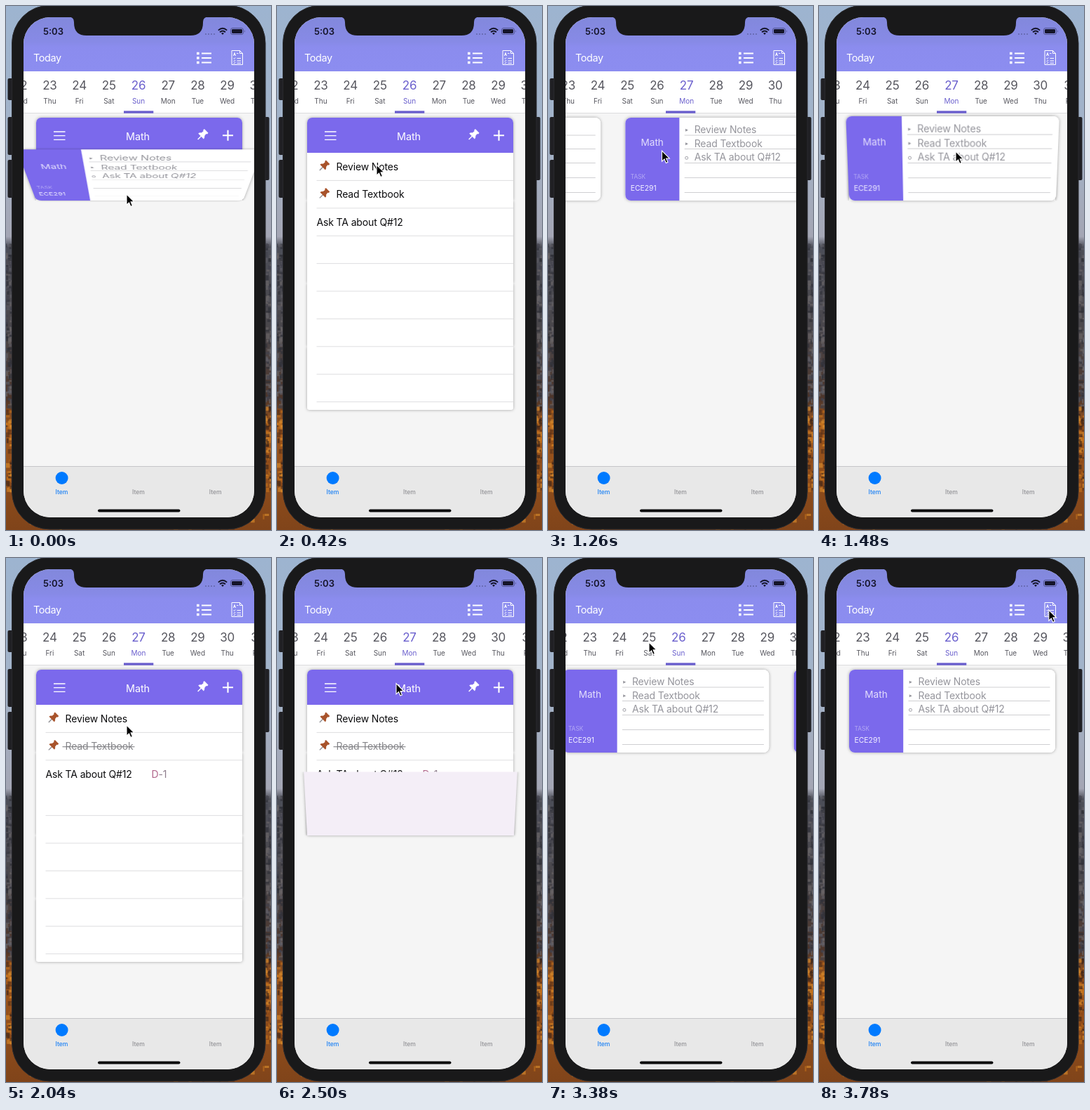
Recreate the animation shown at these times as an HTML page. Size 378 px wide and 746 px high, loop 3800 ms.

```html
<!DOCTYPE html>
<html lang="en">
<head>
<meta charset="utf-8">
<title>Folding planner card</title>
<style>
html, body { margin: 0; width: 100%; height: 100%; overflow: hidden; background: #1a1a1b; }
#stage { position: relative; width: 378px; height: 746px; overflow: hidden; }
svg { display: block; }
svg text { font-family: Inter, Roboto, sans-serif; white-space: pre; }
.layer { position: absolute; left: 0; top: 0; }
#view { position: absolute; left: 25px; top: 153px; width: 329px; height: 502px; overflow: hidden; }
.page { position: absolute; left: -25px; top: -153px; width: 378px; height: 746px; }
.piece { position: absolute; left: 42.5px; width: 294.5px; }
.face { position: absolute; left: 0; top: 0; width: 100%; height: 100%; overflow: hidden; background: #fff; box-shadow: 0 0 4px rgba(0,0,0,.34); }
.item { font-size: 14px; letter-spacing: -.01em; }
</style>
</head>
<body>
<div id="stage">
  <svg class="layer" width="378" height="746" viewBox="0 0 378 746">
    <defs>
      <linearGradient id="wall" x2="0" y2="1">
        <stop offset="0" stop-color="#9db4d0"/><stop offset=".25" stop-color="#a3b3c8"/>
        <stop offset=".44" stop-color="#a4a6b4"/><stop offset=".46" stop-color="#4c4e58"/>
        <stop offset=".62" stop-color="#4a474b"/><stop offset=".75" stop-color="#4d352a"/>
        <stop offset=".8" stop-color="#a0571c"/><stop offset="1" stop-color="#80441a"/>
      </linearGradient>
      <linearGradient id="bar" x2="0" y2="1">
        <stop offset="0" stop-color="#8288dc"/><stop offset=".45" stop-color="#878ae6"/>
        <stop offset=".55" stop-color="#8b8cee"/><stop offset="1" stop-color="#8c8df0"/>
      </linearGradient>
      <clipPath id="screen"><rect x="25" y="16" width="329" height="712" rx="38"/></clipPath>
    </defs>
    <rect width="378" height="746" fill="url(#wall)"/>
    <g id="rocks"></g>
    <g fill="#202024">
      <rect x="2.5" y="103" width="8" height="31" rx="2"/>
      <rect x="2.5" y="158" width="8" height="54" rx="2"/>
      <rect x="2.5" y="219" width="8" height="54" rx="2"/>
      <rect x="368" y="158" width="7.5" height="90" rx="2"/>
    </g>
    <rect x="8.5" y="-1" width="361.5" height="746" rx="54" fill="#19191a" stroke="#2a2a2e"/>
    <g clip-path="url(#screen)">
      <rect x="25" y="16" width="329" height="712" fill="#f5f5f5"/>
      <rect x="25" y="16" width="329" height="77" fill="url(#bar)"/>
      <path d="M90 15.5Q97 16 97 23V24Q97 42 115 42H263Q281 42 281 24V23Q281 16 288 15.5Z" fill="#19191a"/>
      <text x="53" y="41" font-size="13" font-weight="600" fill="#15152a">5:03</text>
      <g fill="#6468ad"><circle cx="285" cy="40" r="1.1"/><circle cx="289" cy="40" r="1.1"/><circle cx="293" cy="40" r="1.1"/><circle cx="297" cy="40" r="1.1"/></g>
      <g fill="none" stroke="#15152a" stroke-width="1.9">
        <path d="M302.8 34.6Q309 29 315.2 34.6M305 37.2Q309 33.6 313 37.2"/>
        <path d="M309 41L307 38.8Q309 37.3 311 38.8Z" fill="#15152a" stroke="none"/>
      </g>
      <rect x="320.5" y="31.5" width="18" height="9" rx="2.6" fill="none" stroke="#4b4e86" stroke-width=".9"/>
      <rect x="322" y="33" width="15" height="6" rx="1.4" fill="#15152a"/>
      <path d="M340 34.3Q341.8 36 340 37.8Z" fill="#4b4e86"/>
      <text x="39" y="79" font-size="14.4" letter-spacing="-.35" fill="#fff">Today</text>
      <g stroke="#fff" stroke-width="2">
        <path d="M279 67.5H293M279 74H293M279 80.5H293"/>
        <path d="M272 67.5H275.6M272 74H275.6M272 80.5H275.6" stroke-width="3.4"/>
      </g>
      <g fill="none" stroke="#fff" stroke-width="1">
        <path d="M322 63.5H333.5L337.5 67.5V83.5H322ZM333.5 63.5V67.5H337.5"/>
        <path d="M324.5 71L326 66.5 327.5 71M325 69.5H327M329 67.5H331.5M324.5 74.5L325.5 75.5 327 73.5M329.5 74.5H335M324.5 78L325.5 79 327 77M329.5 78H335M324.5 81L325.5 82 327 80M329.5 81.3H335"/>
      </g>
      <rect x="25" y="93" width="329" height="60" fill="#fff"/>
      <path d="M25 152.5H354" stroke="#dcdcde"/>
      <g id="dates" text-anchor="middle"></g>
      <rect x="168" y="149.3" width="42.3" height="3.4" fill="#6a5fcd"/>
      <rect x="25" y="655" width="329" height="73" fill="#e8e8e8"/>
      <path d="M25 655.5H354" stroke="#c6c6c8"/>
      <circle cx="79.6" cy="672" r="9" fill="#007aff"/>
      <g font-size="8.6" font-weight="500" text-anchor="middle" fill="#929296">
        <text x="79.5" y="695" fill="#1a80f5">Item</text><text x="189" y="695">Item</text><text x="298.7" y="695">Item</text>
      </g>
      <rect x="131" y="716.4" width="117.5" height="4.2" rx="2.1" fill="#0b0b0c"/>
    </g>
  </svg>
  <div id="view"></div>
  <svg class="layer" width="378" height="746" viewBox="0 0 378 746">
    <path id="cursor" d="M0 0V15.2L3.5 11.9 5.9 17.4 8.4 16.3 6.1 10.9H10.8Z" fill="#000" stroke="#fff" stroke-width="1.1"/>
  </svg>
</div>
<script>
const LOOP = 3800, STEP = 60, DEPTH = 636, PAGE_W = 329, DAY_W = 42.2;
const DAYS = ['Sun', 'Mon', 'Tue', 'Wed', 'Thu', 'Fri', 'Sat'];
const PURPLE = '#7b69ec';
const $ = id => document.getElementById(id);
const clamp = (v, lo = 0, hi = 1) => Math.min(hi, Math.max(lo, v));
const easeIn = x => clamp(x) ** 1.7;
const easeOut = x => 1 - easeIn(1 - x);
const glide = (t, start, length) => 1 - (1 - clamp((t - start) / length)) ** 3;

// Cards: when each one opens, closes and gets its task crossed out
const CARDS = [
  { open: -45.7, close: 756.7, strike: 480, row: 0, due: false },
  { open: 1464.8, close: 2280, strike: 1910, row: 1, due: true }
];
const TASKS = ['Review Notes', 'Read Textbook', 'Ask TA about Q#12'];
const POINTER = [
  [0, 172, 268], [140, 172, 266], [420, 142, 226], [520, 142, 226], [730, 155, 195], [940, 155, 195],
  [1120, 236, 208], [1230, 160, 206], [1420, 195, 207], [1520, 195, 207], [1840, 152, 262],
  [1920, 152, 262], [2040, 172, 238], [2240, 170, 179], [2860, 170, 178], [3020, 92, 176],
  [3170, 168, 158], [3380, 144, 120], [3700, 326, 74], [3800, 328, 74]
];

function drawRocks() {
  let seed = 7, out = '';
  const rnd = () => (seed = seed * 16807 % 2147483647) / 2147483647;
  const stone = ['#2f3038', '#5e5d64', '#43434d', '#6b6668'];
  const leaf = ['#c4701d', '#3d2417', '#8d4a1a', '#d98a2c', '#59321a'];
  for (let i = 0; i < 420; i++) {
    const y = 338 + rnd() * 408, set = y > 570 ? leaf : stone;
    const x = y > 690 ? rnd() * 378 : rnd() < .5 ? rnd() * 9 - 2 : 368 + rnd() * 9;
    out += `<rect x="${x.toFixed(1)}" y="${y.toFixed(1)}" width="${(2 + rnd() * 5).toFixed(1)}" height="${(2 + rnd() * 6).toFixed(1)}" fill="${set[Math.floor(rnd() * set.length)]}" opacity=".65"/>`;
  }
  $('rocks').innerHTML = out;
}

function tack(x, y, size, body, needle) {
  return `<g transform="translate(${x} ${y}) rotate(45) scale(${size})">
    <path d="M0 2V9.5" stroke="${needle}" stroke-width="1.5"/>
    <path d="M-4.2-8.5H4.2V-6L2.9-5.2 3.4-1.4Q5.8 0 5.8 2.8H-5.8Q-5.8 0-3.4-1.4L-2.9-5.2-4.2-6Z" fill="${body}"/></g>`;
}

function closedArt() {
  const rules = [184, 203.5, 223.5, 244.5, 265.5].map(y => `M127 ${y}H329`).join('');
  const lines = TASKS.map((s, i) => `<text class="item" x="141" y="${181 + i * 19.7}">${s}</text>`).join('');
  return `<rect x="42" y="159" width="296" height="119" fill="#fff"/>
    <rect x="42" y="159" width="77.7" height="119" fill="${PURPLE}"/>
    <path d="${rules}" stroke="#cfcfd2"/>
    <g fill="#95959c">${lines}
      <path d="M128.3 174.7L132.3 176.7 128.3 178.7ZM128.3 194.2L132.3 196.2 128.3 198.2Z"/></g>
    <circle cx="130" cy="216.3" r="2" fill="none" stroke="#95959c" stroke-width=".9"/>
    <text x="81" y="199" font-size="13.6" text-anchor="middle" fill="#e3defc">Math</text>
    <text x="50" y="246" font-size="8.4" fill="#b3a8f4">TASK</text>
    <text x="50" y="263" font-size="10.4" fill="#f3f1ff">ECE291</text>`;
}

function openArt(card) {
  let rules = '';
  for (let i = 1; i < 10; i++) if (!(card.due && i === 3)) rules += `M56 ${209 + i * 39.4}H338`;
  const rows = TASKS.map((s, i) => {
    const y = 234 + i * 39.4, x = i < 2 ? 84 : 56;
    const own = i === card.row;
    return (i < 2 ? tack(66.5, y - 6.2, .92, '#a8532b', '#8d8d92') : '') +
      `<text class="item${own ? ' done' : ''}" x="${x}" y="${y}" fill="#0c0c0e">${s}</text>` +
      (own ? `<path class="cross" d="M80 ${y - 4.6}H${i ? 183 : 175}" stroke="#77777b" stroke-width="1.1"/>` : '');
  }).join('');
  const due = '<text class="item" x="207" y="312.8" fill="#b0648a">D<tspan fill="#8d7c8b">-1</tspan></text>';
  return `<path d="${rules}" stroke="#dedee0"/>
    <rect x="42" y="159" width="296" height="50" fill="${PURPLE}"/>
    <path d="M67.5 179H84M67.5 184.7H84M67.5 190.4H84" stroke="#fff" stroke-width="1.3"/>
    <text x="187.5" y="191" font-size="14.4" text-anchor="middle" letter-spacing="-.1" fill="#fff">Math</text>
    ${tack(279.5, 183.6, .95, '#fff', '#fff')}
    <path d="M308.5 184.3H323.5M316 176.8V191.8" stroke="#fff" stroke-width="2.1"/>
    ${rows}${card.due ? due : ''}`;
}

function piece(parent, top, height, art, radius, edge, pivot) {
  const el = document.createElement('div');
  el.className = 'piece';
  el.style.cssText = `top:${top}px;height:${height}px;transform-origin:50% ${pivot}`;
  el.innerHTML = `<div class="face" style="border-radius:${radius};clip-path:inset(${edge})">` +
    (art ? `<svg width="294.5" height="${height}" viewBox="42.5 ${art.y} 294.5 ${height}">${art.body}</svg>` : '') + '</div>';
  if (!art) el.firstChild.style.background = '#f4eef7';
  parent.append(el);
  return el;
}

function buildPage(card) {
  const el = document.createElement('div');
  el.className = 'page';
  $('view').append(el);
  const body = openArt(card), all = '-6px';
  const part = (y, h, r, edge) => piece(el, y, h, { y, body }, r, edge, 'top');
  const first = part(159, 118, '7px 7px 0 0', '-6px -6px 0');
  const second = part(277, 118, 0, '0 -6px');
  const third = part(395, 90, 0, '0 -6px');
  const fourth = part(485, 89.5, '0 0 3px 3px', '0 -6px -6px');
  const flap = (owner, top) => {
    const f = piece(owner, top, 90, null, 0, '0 -6px -6px', 'bottom');
    f.style.left = 0;
    return f;
  };
  const back2 = flap(second, 28), back3 = flap(third, 0);
  const front = piece(el, 159, 118, { y: 159, body: closedArt() }, '8px', all, 'bottom');
  return { el, first, folds: [front, second, back2, third, back3, fourth],
    done: el.querySelectorAll('.done'), cross: el.querySelectorAll('.cross') };
}

// Six quarter turns: even ones lift a flap away, odd ones lay the next part down
function fold(page, u) {
  page.first.style.display = u > 0 ? '' : 'none';
  page.folds.forEach((el, k) => {
    const lift = k % 2 === 0, x = u - k;
    const seen = lift ? x < 1 : x > 0;
    const angle = lift ? -90 * easeIn(x) : 90 * (1 - easeOut(x));
    el.style.display = seen ? '' : 'none';
    el.style.transform = Math.abs(angle) > .01 ? `perspective(${DEPTH}px) rotateX(${angle}deg)` : 'none';
  });
}

function pointerAt(t) {
  let i = 0;
  while (i < POINTER.length - 2 && t >= POINTER[i + 1][0]) i++;
  const [t0, x0, y0] = POINTER[i], [t1, x1, y1] = POINTER[i + 1];
  const k = clamp((t - t0) / (t1 - t0)), s = k * k * (3 - 2 * k);
  return [x0 + (x1 - x0) * s, y0 + (y1 - y0) * s];
}

drawRocks();
const pages = CARDS.map(buildPage);
const dates = [];
for (let n = 21; n <= 32; n++) {
  const g = document.createElementNS('http://www.w3.org/2000/svg', 'g');
  g.innerHTML = `<text y="119" font-size="17" letter-spacing="-.2">${n > 31 ? n - 31 : n}</text>
    <text y="139" font-size="10">${DAYS[(n + 2) % 7]}</text>`;
  $('dates').append(g);
  dates.push({ n, g });
}

function render(t) {
  const pos = glide(t, 1150, 270) - glide(t, 3060, 538);
  for (const { n, g } of dates) {
    g.setAttribute('transform', `translate(${189 + (n - 26 - pos) * DAY_W} 0)`);
    g.setAttribute('fill', n === 26 + Math.round(pos) ? '#6a5fcd' : '#56565e');
  }
  pages.forEach((page, i) => {
    const c = CARDS[i], off = (i - pos) * PAGE_W;
    page.el.style.transform = off ? `translateX(${off}px)` : 'none';
    fold(page, clamp(Math.min((t - c.open) / STEP, 6 - (t - c.close) / STEP), 0, 6));
    const struck = t >= c.strike;
    page.done.forEach(e => e.setAttribute('fill', struck ? '#86868a' : '#0c0c0e'));
    page.cross.forEach(e => e.setAttribute('visibility', struck ? 'visible' : 'hidden'));
  });
  $('cursor').setAttribute('transform', `translate(${pointerAt(t).join(' ')})`);
}

function tick() {
  render(performance.now() % LOOP);
  requestAnimationFrame(tick);
}
tick();
</script>
</body>
</html>
```
